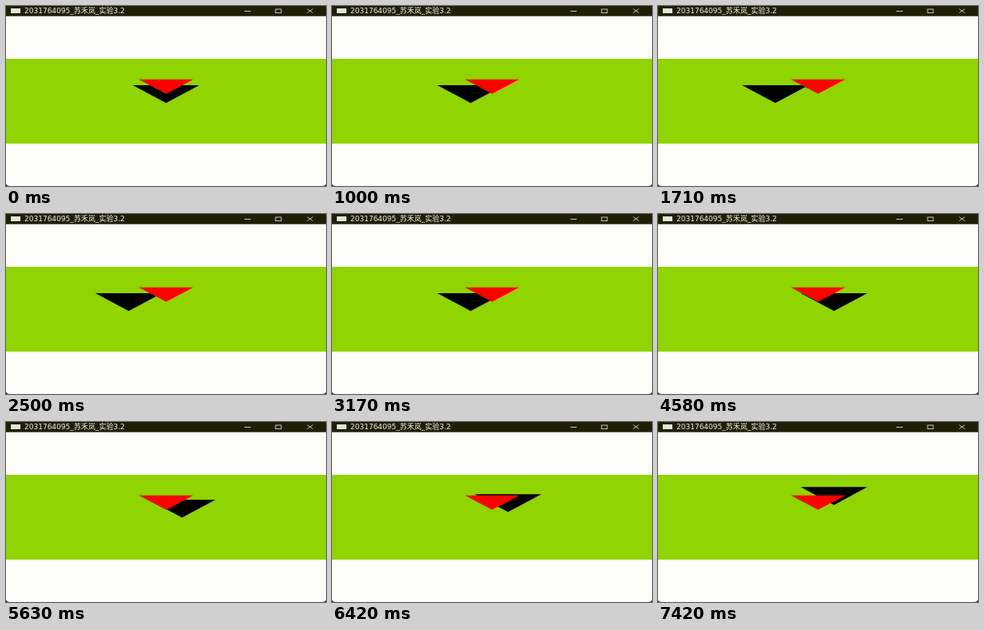
These frames come from a looping animation (400x225 px, 8 s). An HTML page with a canvas:

```html
<!DOCTYPE html>
<html lang="zh">
<head>
<meta charset="utf-8">
<title>实验3.2</title>
<style>
  html, body { margin: 0; width: 100%; height: 100%; overflow: hidden; background: #fffffa; }
  canvas { display: block; width: 400px; height: 225px; }
</style>
</head>
<body>
<canvas id="stage"></canvas>
<script>
const W = 400, H = 225, BAR = 12.7, LOOP = 8000;
const STEP_X = W / 60, STEP_Y = 212 / 120;

// Times of the key presses, in ms
const LEFT = [290, 580, 790, 1000, 1170, 1350, 1540, 1710];
const RIGHT = [2500, 2730, 2950, 3170, 3380, 3580, 3780, 3980, 4180, 4380, 4580];
const UP = [5630, 5830, 6030, 6220, 6420, 6630, 6830, 7030, 7220, 7420];

const canvas = document.getElementById('stage');
const ctx = canvas.getContext('2d');
const dpr = window.devicePixelRatio || 1;
canvas.width = W * dpr;
canvas.height = H * dpr;
ctx.scale(dpr, dpr);

const pressed = (times, t) => times.filter(at => at <= t).length;

function rect(x, y, w, h, color) {
  ctx.fillStyle = color;
  ctx.fillRect(x, y, w, h);
}

function triangle(cx, top, halfWidth, height, color) {
  ctx.fillStyle = color;
  ctx.beginPath();
  ctx.moveTo(cx - halfWidth, top);
  ctx.lineTo(cx + halfWidth, top);
  ctx.lineTo(cx, top + height);
  ctx.fill();
}

function line(x1, y1, x2, y2) {
  ctx.beginPath();
  ctx.moveTo(x1, y1);
  ctx.lineTo(x2, y2);
  ctx.stroke();
}

function titleBar() {
  rect(0, 0, W, BAR, '#1f1f06');
  rect(6, 3, 12, 6, '#dfe8d4');
  ctx.fillStyle = '#f4f4e8';
  ctx.font = '9px "DejaVu Sans", "Noto Sans CJK SC", "Noto Sans CJK", sans-serif';
  ctx.textBaseline = 'alphabetic';
  ctx.fillText('2031764095_苏禾岚_实验3.2', 23, 9);
  ctx.strokeStyle = '#d8d8cc';
  ctx.lineWidth = 0.9;
  line(298, 6.5, 306, 6.5);
  ctx.strokeRect(337, 4, 7, 4.6);
  line(376.5, 3.6, 383.5, 8.6);
  line(383.5, 3.6, 376.5, 8.6);
}

function corner(x, dir) {
  ctx.fillStyle = '#1f1f06';
  ctx.beginPath();
  ctx.moveTo(x, H);
  ctx.lineTo(x, H - 3);
  ctx.quadraticCurveTo(x, H, x + dir * 5, H);
  ctx.fill();
}

function draw(t) {
  const dx = (pressed(RIGHT, t) - pressed(LEFT, t)) * STEP_X;
  const dy = pressed(UP, t) * STEP_Y;
  rect(0, 0, W, H, '#fffffa');
  rect(0, 66, W, 106, '#90d400');
  triangle(200 + dx, 99 - dy, 41.7, 22.3, '#000');
  triangle(200, 91.8, 34, 18, '#f00');
  titleBar();
  corner(0, 1);
  corner(W, -1);
}

const start = performance.now();
function tick() {
  draw((performance.now() - start) % LOOP);
  requestAnimationFrame(tick);
}
tick();
</script>
</body>
</html>
```
